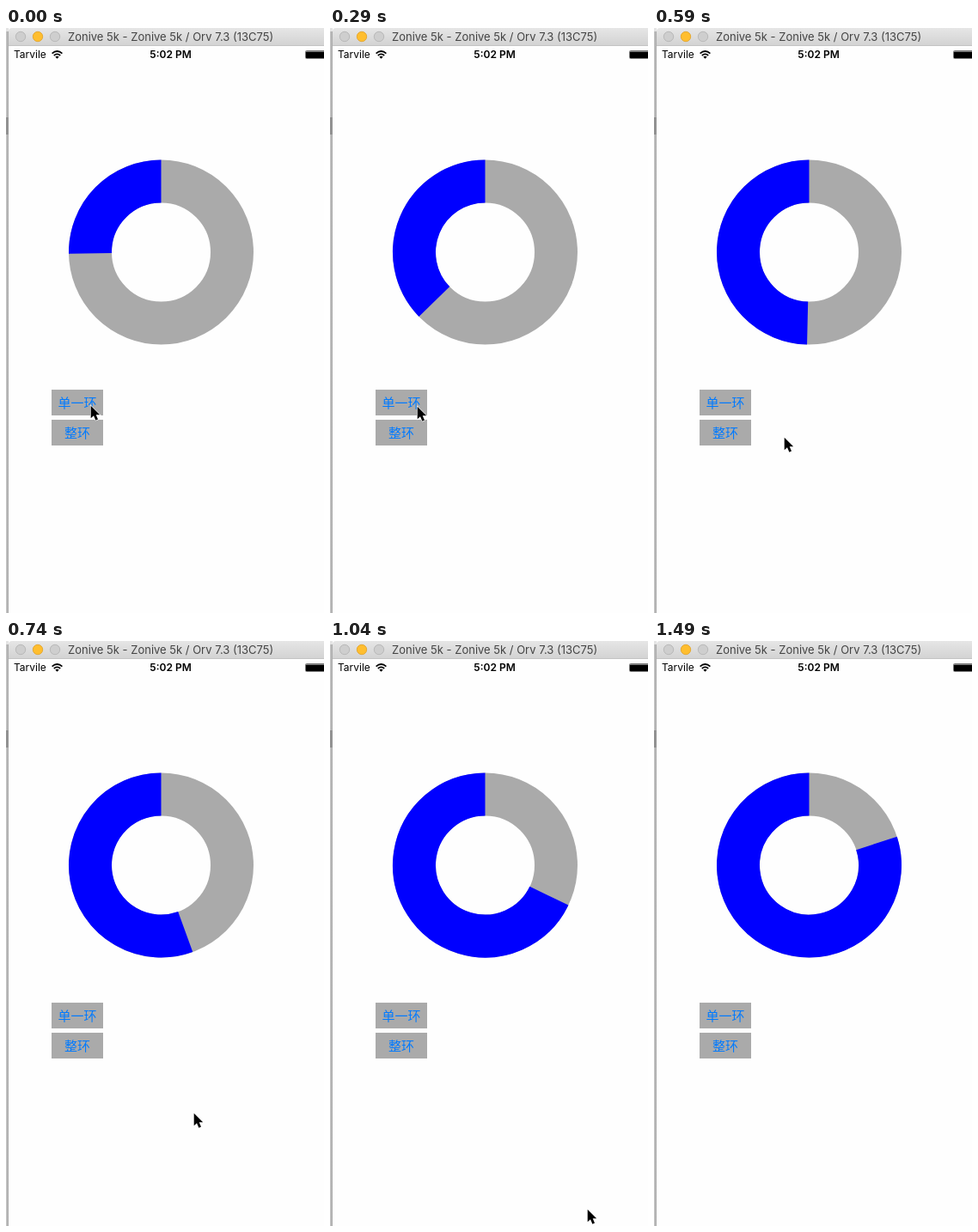
An HTML page that plays this animation: 370x681 px, repeating every 2050 ms.

```html
<!DOCTYPE html>
<html lang="zh-CN">
<head>
<meta charset="utf-8">
<title>Ring progress</title>
<style>
  html, body { margin: 0; width: 100%; height: 100%; overflow: hidden; background: #fefefe; }
  svg { display: block; width: 370px; height: 681px; }
  text { font-family: Inter, Roboto, sans-serif; white-space: pre; }
  .button { font: 15px "Noto Sans CJK SC", "Noto Sans CJK", sans-serif; fill: #007aff; text-anchor: middle; }
</style>
</head>
<body>
<svg viewBox="0 0 370 681">
  <defs>
    <linearGradient id="bar" x2="0" y2="1">
      <stop offset="0" stop-color="#e6e6e6"/>
      <stop offset="1" stop-color="#d2d2d2"/>
    </linearGradient>
    <linearGradient id="edge">
      <stop offset="0" stop-color="#c9c9c9"/>
      <stop offset="1" stop-color="#a6a6a6"/>
    </linearGradient>
  </defs>
  <rect width="370" height="681" fill="#fefefe"/>

  <!-- Window behind and title bar -->
  <rect width="3" height="681" fill="url(#edge)"/>
  <rect width="3" height="4" fill="#e4e4e4"/>
  <rect y="104" width="3" height="20" fill="#929292"/>
  <path d="M3 21V4Q3 0 7 0H370V21Z" fill="url(#bar)"/>
  <rect x="3" y="20" width="367" height="1" fill="#c4c4c4"/>
  <g fill="#cecece" stroke="#b9b9b9">
    <circle cx="17" cy="10" r="5.7"/>
    <circle cx="37" cy="10" r="5.7" fill="#ffbe2f" stroke="#e4a934"/>
    <circle cx="57" cy="10" r="5.7"/>
  </g>
  <text x="72" y="15" font-size="13" fill="#444">Zonive 5k - Zonive 5k / Orv 7.3 (13C75)</text>

  <!-- Status bar -->
  <text x="9" y="35.3" font-size="12">Tarvile</text>
  <g fill="none" stroke="#000" stroke-width="1.7">
    <path d="M53.6 29.6Q59.5 24.4 65.4 29.6"/>
    <path d="M55.8 32Q59.5 28.8 63.2 32"/>
  </g>
  <path d="M57.3 33.6Q59.5 31.9 61.7 33.6L59.5 35.8Z"/>
  <text x="191.5" y="35.3" font-size="12" font-weight="600" text-anchor="middle">5:02 PM</text>
  <rect x="348.5" y="26.5" width="24" height="9" rx="1" fill="none" stroke="#777"/>
  <rect x="349" y="27.5" width="21" height="7.5"/>

  <!-- Ring -->
  <g fill="none" stroke-width="50">
    <circle cx="180.5" cy="261" r="82.5" stroke="#aaa"/>
    <path id="arc" stroke="#00f"/>
  </g>

  <rect x="53" y="421" width="60" height="30" fill="#aaa"/>
  <text class="button" x="83" y="441.7">单一环</text>
  <rect x="53" y="456" width="60" height="30" fill="#aaa"/>
  <text class="button" x="83" y="476.7">整环</text>

  <path id="cursor" d="M.7 .8V15.2L4 12.2L6.4 17.7L9 16.6L6.7 11.3H11.2Z"
        stroke="#fff" stroke-width="1.2" paint-order="stroke"/>
</svg>
<script>
const LOOP = 2050, CX = 180.5, CY = 261, R = 82.5;
// Start time, swept degrees, pointer x and y (none once it has left)
const steps = [
  [0, 90.9, 98, 439],
  [150, 114, 98, 439],
  [290, 134.2, 101, 440],
  [440, 154.4, 116, 449],
  [590, 178.7, 151, 476],
  [740, 200, 218, 549],
  [890, 223.3, 284, 649],
  [1040, 244.4, 299, 661],
  [1190, 266.5, 301, 672],
  [1340, 287.4],
  [1490, 288]
];
const arc = document.getElementById("arc");
const cursor = document.getElementById("cursor");

function draw(time) {
  const t = time % LOOP;
  const [, sweep, x = -50, y = -50] = steps.findLast(step => step[0] <= t);
  const a = sweep * Math.PI / 180;
  const endX = CX - R * Math.sin(a), endY = CY - R * Math.cos(a);
  arc.setAttribute("d", `M${CX} ${CY - R}A${R} ${R} 0 ${+(sweep > 180)} 0 ${endX} ${endY}`);
  cursor.setAttribute("transform", `translate(${x} ${y})`);
}

const start = performance.now();
function tick() {
  draw(performance.now() - start);
  requestAnimationFrame(tick);
}
tick();
</script>
</body>
</html>
```
